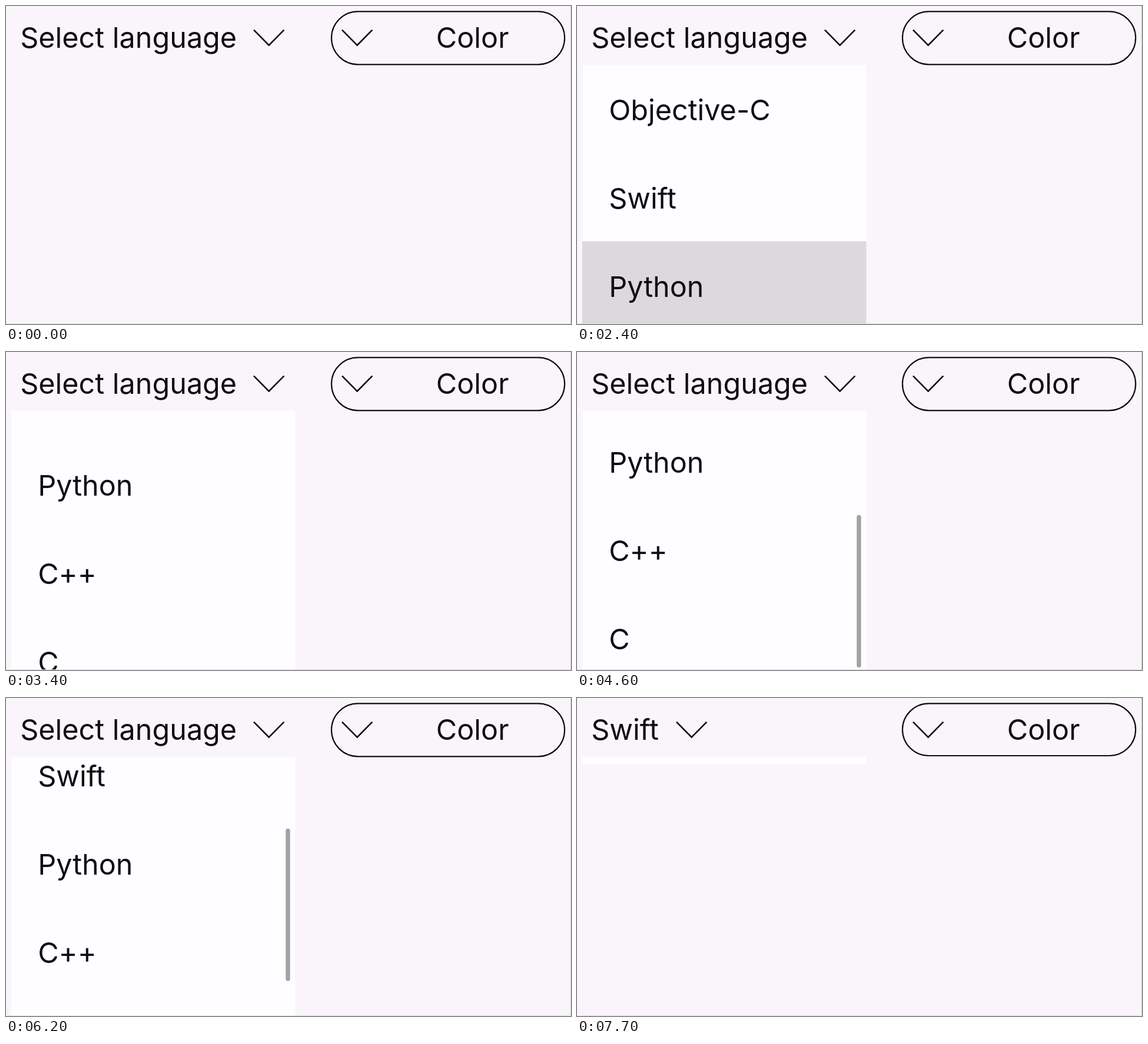
Recreate the animation shown at these times as an HTML page. Size 960 by 540 pixels, loop 8 s.

```html
<!DOCTYPE html>
<html lang="en">
<head>
<meta charset="utf-8">
<title>Dropdown menus</title>
<style>
  html, body { margin: 0; width: 100%; height: 100%; overflow: hidden; background: #f9f5fb; }
  svg { display: block; }
  text {
    font: 400 48.5px Inter, "Liberation Sans", sans-serif;
    font-optical-sizing: none;
    font-feature-settings: "calt" 0;
    fill: #100d12;
  }
  .line { fill: none; stroke: #100d12; stroke-width: 2.7; }
  #pill { stroke-width: 2.2; }
</style>
</head>
<body>
<svg width="960" height="540" viewBox="0 0 960 540">
  <defs>
    <clipPath id="clip"><rect id="opening" x="8.7" y="100" width="483" height="450"/></clipPath>
  </defs>
  <rect width="960" height="540" fill="#f9f5fb"/>

  <text id="label" x="24.2" y="70.7">Select language</text>
  <path id="arrow" class="line" d="M421 40.6l25.7 26l25.7-26"/>
  <rect id="pill" class="line" x="553" y="9.4" width="396.2" height="89.9" rx="45"/>
  <path class="line" d="M571 40.6l25.7 26l25.7-26"/>
  <text x="730.8" y="70.7">Color</text>

  <g clip-path="url(#clip)">
    <rect x="8.7" y="100" width="483" height="450" fill="#fefdff"/>
    <g id="list">
      <rect id="highlight" x="8.7" width="483" height="150" fill="#dcd8dc"/>
    </g>
    <rect id="bar" x="475.3" width="7.4" rx="3.7" fill="#000"/>
  </g>

  <path d="M0 539.5H960" stroke="#e3e0e3"/>
  <path d="M959.5 0V540" stroke="#cfccd1"/>
  <path d="M.5 0V540" stroke="#f2eff4"/>
</svg>
<script>
const LOOP = 8000, STEP = 100;
const ROW = 150, LIST_TOP = 99.5, MAX_SCROLL = 300, BAR_LENGTH = 259;
const $ = id => document.getElementById(id);
const set = (id, attrs) => {
  for (const name in attrs) $(id).setAttribute(name, attrs[name]);
};

["Objective-C", "Swift", "Python", "C++", "C"].forEach((name, row) => {
  const text = document.createElementNS("http://www.w3.org/2000/svg", "text");
  text.textContent = name;
  text.setAttribute("x", 54.2);
  text.setAttribute("y", LIST_TOP + row * ROW + 94);
  $("list").append(text);
});

function ease(t, start, end, from, to) {
  const p = Math.min(1, Math.max(0, (t - start) / (end - start)));
  return from + (to - from) * p * p * (3 - 2 * p);
}

// Critically damped return from beyond the end of the list
function bounce(t, start, distance) {
  const x = 0.0109 * (t - start);
  return distance * (1 + x) * Math.exp(-x);
}

function scrollAt(t) {
  if (t < 4400) return ease(t, 2400, 3200, 0, 250);
  if (t < 4900) return ease(t, 4400, 4900, 250, 360);
  if (t < 5600) return MAX_SCROLL + bounce(t, 4900, 60);
  return ease(t, 5900, 6600, MAX_SCROLL, 30);
}

function heightAt(t) {
  if (t < 500) return 0;
  if (t < 600) return 290;
  if (t < 7600) return 450;
  return t < 7700 ? 220 : 13;
}

function barOpacity(t) {
  if (t < 2500) return 0;
  if (t < 3400) return t < 3300 ? 1 : 0.5;
  if (t < 4500) return 0;
  if (t < 5600) return t < 5500 ? 1 : 0.5;
  if (t < 6000) return 0;
  if (t < 6800) return t < 6700 ? 1 : 0.55;
  return 0.1;
}

function highlightedRow(t) {
  if (t >= 2400 && t < 2500) return 2;
  return t >= 7500 ? 1 : -1;
}

function draw(t) {
  const scroll = scrollAt(t);
  const over = Math.max(0, scroll - MAX_SCROLL);
  const row = highlightedRow(t);
  const chosen = t >= 7600;

  $("label").textContent = chosen ? "Swift" : "Select language";
  set("arrow", { transform: `translate(${chosen ? -252 : 0} 0)` });
  set("pill", { height: chosen ? 88.6 : 89.9 });
  set("opening", { height: heightAt(t) });
  set("list", { transform: `translate(0 ${-scroll})` });
  set("highlight", { y: LIST_TOP + row * ROW, opacity: row < 0 ? 0 : 1 });
  // Past the end the bar is squeezed against the bottom
  set("bar", {
    y: 109.3 + 0.58 * (scroll - over) + over,
    height: BAR_LENGTH - over,
    opacity: 0.36 * barOpacity(t)
  });
}

function frame(now) {
  draw(Math.floor((now % LOOP) / STEP) * STEP);
  requestAnimationFrame(frame);
}
draw(0);
requestAnimationFrame(frame);
</script>
</body>
</html>
```
